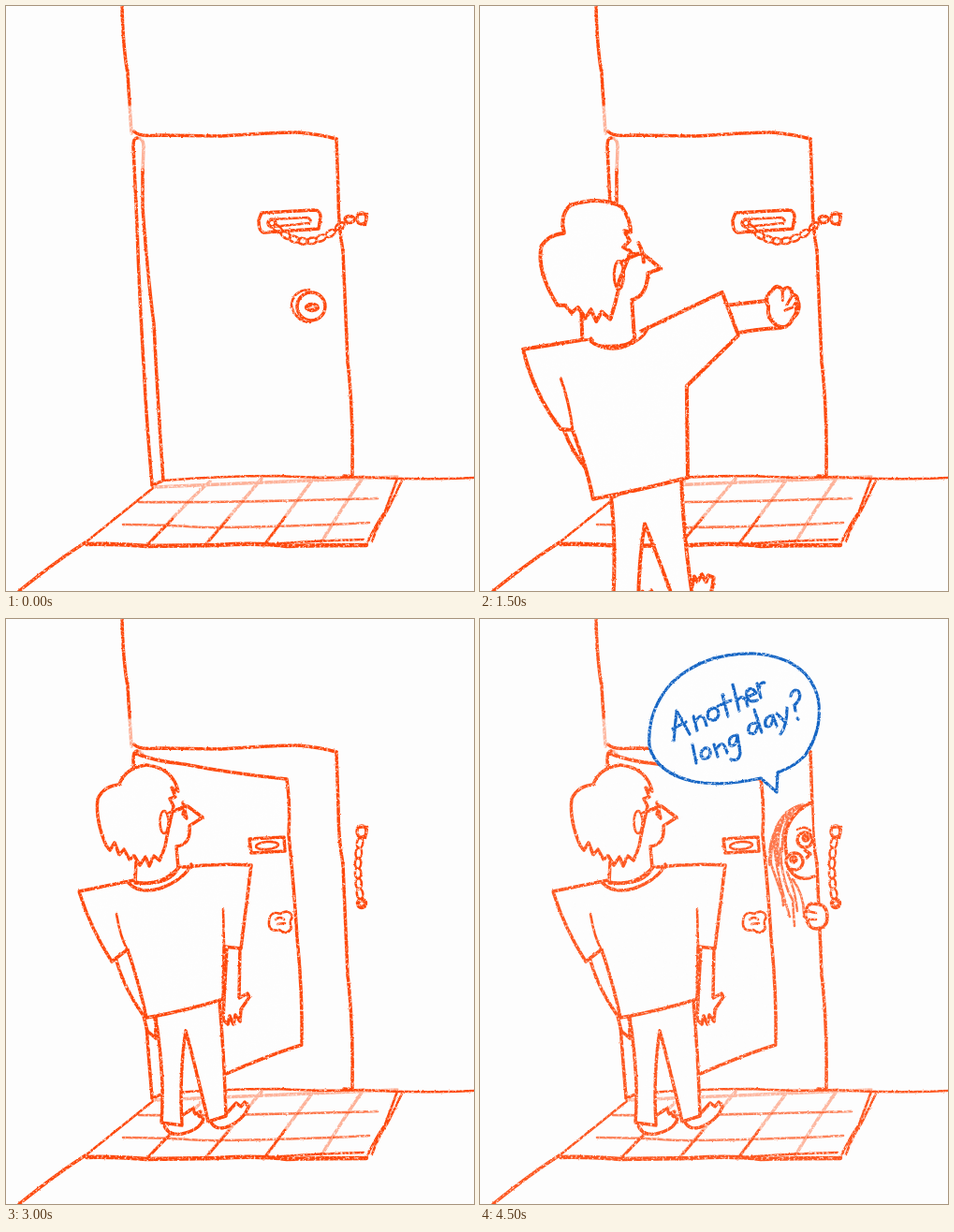
An HTML page that plays this animation: 500 by 625 pixels, repeating every 5000 ms.

```html
<!DOCTYPE html>
<html lang="en">
<head>
<meta charset="utf-8">
<title>Knock knock</title>
<style>
  html, body { margin: 0; width: 100%; height: 100%; overflow: hidden; background: #fdfdfd; }
  svg { display: block; width: 100vw; height: 100vh; }
  #scene { fill: none; stroke: #fd480c; stroke-width: 3.5; stroke-linecap: round; stroke-linejoin: round; }
  .solid { fill: #fdfdfd; }
  .mask { fill: #fdfdfd; stroke: none; }
  .pale { opacity: .42; }
  .thin { stroke-width: 2.6; }
  .bold { stroke-width: 4.4; }
  .blue { stroke: #1565c4; stroke-width: 3.2; }
</style>
</head>
<body>
<svg viewBox="0 0 500 625">
  <filter id="crayon" filterUnits="userSpaceOnUse" x="0" y="0" width="500" height="625" color-interpolation-filters="sRGB">
    <feTurbulence type="fractalNoise" baseFrequency=".4" numOctaves="2" seed="4" result="noise"/>
    <feDisplacementMap in="SourceGraphic" in2="noise" scale="2" xChannelSelector="R" yChannelSelector="G" result="rough"/>
    <feColorMatrix in="noise" values="0 0 0 0 0  0 0 0 0 0  0 0 0 0 0  0 0 0 3 -.45" result="grain"/>
    <feComposite in="rough" in2="grain" operator="in"/>
  </filter>
  <g filter="url(#crayon)"><g id="scene"></g></g>
</svg>
<script>
const line = (d, cls = '') => `<path class="${cls}" d="${d}"/>`;
const solid = d => line(d, 'solid');
const oval = (x, y, rx, ry, cls = '', turn = 0) =>
  `<ellipse class="${cls}" cx="${x}" cy="${y}" rx="${rx}" ry="${ry}" transform="rotate(${turn} ${x} ${y})"/>`;
const group = (content, transform = '', opacity = 1) =>
  `<g transform="${transform}" opacity="${opacity}">${content}</g>`;

// Links laid along a quadratic curve.
function chain(x0, y0, cx, cy, x1, y1, count) {
  let links = '';
  for (let i = 0; i < count; i++) {
    const t = (i + .5) / count, u = 1 - t;
    const x = u * u * x0 + 2 * u * t * cx + t * t * x1;
    const y = u * u * y0 + 2 * u * t * cy + t * t * y1;
    const dx = u * (cx - x0) + t * (x1 - cx), dy = u * (cy - y0) + t * (y1 - cy);
    links += oval(x, y, 5.5, 3.2, 'thin', Math.atan2(dy, dx) * 180 / Math.PI);
  }
  return links;
}

const room =
  line('M124 0Q125 45 130 72L132 105') + line('M132 105L134 136', 'pale') +
  line('M137 134Q141 140 165 138L230 139Q290 135 312 135Q335 137 353 142') +
  line('M353 142L355 200Q355 235 360 262L365 380Q371 430 370 503L361 502') +
  line('M156 511Q150 440 148 400Q142 300 140 235L136 150Q136 141 140 141') +
  line('M140 141Q147 141 147 150L146 180', 'pale') +
  line('M146 175L146 215Q151 285 158 340Q162 420 168 507L156 512') +
  line('M168 507Q230 502 290 502Q340 505 380 503Q440 507 500 504', 'thin') +
  line('M14 625Q55 592 85 573') + line('M85 573L157 515', 'thin') +
  line('M86 575Q110 574 150 577L225 576Q270 573 300 577Q345 576 385 576', 'bold') +
  line('M280 575Q335 571 382 570M385 576Q393 557 405 540L418 505M391 572Q398 552 408 538L423 507', 'thin') +
  line('M158 514L418 503M218 508Q195 528 150 577M273 505L212 577M330 503L275 577M382 503Q360 534 337 573', 'pale') +
  line('M178 548L150 577M238 547L212 577M298 546L275 577', 'thin') +
  group(line('M142 530Q230 531 397 526M125 554Q170 554 210 557Q290 557 388 552', 'thin'), '', .75);

const plate =
  line('M273 221L329 218Q336 218 336 225L334 238L275 242Q270 241 270 229Z') +
  line('M283 228L322 226Q328 229 324 232L284 236Q278 232 283 228', 'thin');
const knob = oval(326, 321, 15, 15) + oval(327, 322, 6, 3, 'bold') +
  line('M324 303Q306 304 305 320Q309 337 325 338', 'thin');
const anchor = oval(380, 227, 5, 6) + line('M375 223L386 222L384 234L376 232', 'thin');
const latched = chain(286, 234, 320, 270, 362, 231, 8) + oval(284, 232, 4, 4) +
  oval(367, 228, 5, 3.5) + anchor;
const hanging = anchor + chain(379, 234, 373, 266, 379, 299, 6) + oval(380, 304, 4, 4, 'bold');

const openDoor =
  solid('M139 144Q160 152 190 155Q240 165 300 171Q304 200 302 230Q308 290 311 340Q317 400 316 455Q280 466 233 487') +
  line('M260 235L297 233L298 248L262 250Z') + oval(279, 242, 12, 4, 'thin', -5) +
  line('M293 315Q282 311 281 323Q280 335 292 332Q300 339 305 330Q302 325 306 318Q302 309 293 315M288 321Q293 317 297 321M290 326L298 325', 'thin');

const word =
  line('M69 165L84 160L93 195L107 151L126 149L104 199Q130 208 144 205L153 214L148 229Q125 222 102 215L120 262L104 267Z') +
  line('M148 158L162 155L205 192L178 132L193 126L223 214L213 221L168 179L180 227L168 231Z') +
  oval(254, 153, 32, 36) + oval(254, 153, 16, 20) +
  line('M328 87Q295 93 296 125Q300 163 328 164Q358 160 354 128L338 132Q340 147 326 147Q309 143 311 120Q315 104 332 99Z') +
  line('M347 63L357 58L373 80L379 44L394 46L387 92L428 102L424 121L386 106L402 133L390 140Q373 108 363 84L353 66Z');
const knocks = word + group(word, 'translate(0 265.5)');

const closeMan =
  solid('M-4 500L45 493L71 488L114 478L255 476Q263 479 262 490Q250 538 235 582L222 584L216 630L-4 630Z') +
  solid('M73 489L71 478L67 476L62 468L56 465L52 458L45 456L38 450L36 457L30 444L28 451L22 438Q6 395 7 376Q9 364 20 362L11 358Q24 352 38 357Q50 331 78 330Q108 333 119 358L113 356L117 366L112 371L117 374L112 380L113 400L130 392L154 404L134 417L135 438Q132 452 113 452L115 479') +
  line('M71 478L76 468L80 472L86 462L90 466L94 454L99 456L105 414') +
  line('M107 402Q97 396 97 406Q99 417 104 418M107 402L128 394M113 400L107 416M127 376Q131 388 127 408M130 393L130 407L134 417', 'thin') +
  line('M48 493Q54 510 88 508Q123 506 132 484M51 492Q62 503 96 500Q124 496 130 481') +
  line('M188 582L234 583') + line('M190 550Q183 590 181 625M190 585L191 625M34 553Q40 575 51 594L58 625', 'thin') +
  line('M0 603Q10 617 17 618L47 608M24 616L30 625');

const arm = solid('M262 275L279 262L327 240L343 262Q315 272 288 290L268 300') +
  solid('M326 246Q319 240 325 231Q327 223 334 228Q339 220 344 229Q352 228 349 238Q355 241 351 250Q350 262 340 261Q328 258 326 246') +
  line('M334 228L337 237M344 230L342 240M349 239L342 245', 'thin');

function reachingMan(sleeve, armTransform) {
  return solid('M125 378Q133 400 149 418L147 390') +
    solid('M193 547Q185 554 190 557Q208 554 213 537L206 527L203 533L198 528') +
    solid('M233 541Q234 553 246 552Q262 542 264 515L259 513L257 519L253 512L249 519L246 514L243 527') +
    solid('M169 442Q174 490 170 546L194 547Q194 500 200 465Q213 497 230 545L246 542Q237 490 234 425') +
    group(arm, armTransform) +
    solid(`M150 293L87 303Q97 345 122 377L133 378Q147 415 152 442Q195 434 240 422L239 337L${sleeve}L197 286`) +
    line('M122 330Q130 352 133 378', 'thin') +
    solid('M142 293L141 266L175 215L198 214L215 228L203 232Q202 254 188 257L190 287Q194 299 172 300Q152 302 150 293') +
    solid('M125 194Q121 178 131 169Q160 160 179 171Q187 183 187 194L181 193L186 202L180 208L187 212L176 240L175 250L172 262L168 275L160 268L155 277L150 266L145 274L138 264L132 269L126 262L119 262Q99 230 104 207Q111 196 125 195') +
    oval(176, 234, 4.5, 13, 'thin') +
    line('M177 222L196 214', 'thin') + line('M194 204Q199 213 199 222') +
    line('M150 296Q170 309 191 296Q202 289 203 282', 'thin');
}
const raisedSleeve = '287 290L272 250';
const unlatchingMan = reachingMan(raisedSleeve, '');
const approachingMan = group(reachingMan(raisedSleeve, 'translate(-18 2) rotate(18 283 275)'),
  'translate(-54 18.4) scale(1.15)');
const openingMan = group(reachingMan('278 315L294 286L262 268', 'translate(5 25) rotate(55 283 275)'),
  'translate(-10 -9)');

const standingMan =
  solid('M117 362Q126 395 147 424L151 440L160 448L160 430L130 354') +
  solid('M168 538Q172 553 188 550Q207 546 211 534L206 531L208 526L202 529L200 523L187 531') +
  solid('M218 535Q222 547 235 543Q254 536 259 521L255 516L251 521L246 517L234 530') +
  solid('M160 426Q170 490 166 538L188 541Q185 485 192 440Q203 480 216 537L235 531Q233 465 228 408') +
  solid('M236 350L233 407L232 428L237 433L239 424L243 433L245 423L250 430L251 417L260 404L258 400L249 405L250 350') +
  solid('M137 279L78 291Q90 330 113 366L130 353Q144 396 150 426Q195 418 232 406L233 350L251 352Q257 303 262 263Q225 261 189 265') +
  line('M118 315Q122 340 130 354M232 310L233 350', 'thin') +
  solid('M138 282L139 260L172 208L194 200L210 212L196 221Q198 241 182 243L184 266Q175 285 138 282') +
  solid('M184 184L177 180L181 190L175 192L179 200L172 232L170 243L164 258L158 253L153 264L149 254L143 263L137 253L132 257L126 246L121 252L116 239L111 247L107 242Q95 214 98 192Q105 178 121 177Q127 159 150 156Q178 159 184 184') +
  oval(169, 217, 4.5, 12, 'thin') +
  line('M174 207L190 200', 'thin') + line('M189 196L193 213L189 209L191 199') +
  line('M131 282Q142 294 164 288Q190 279 198 262M138 281Q166 287 186 264');

const girl =
  line('M354 198Q316 195 312 228L310 262L325 310L337 326L340 278L357 276Z', 'mask') +
  line('M352 197Q327 211 326 236Q327 258 331 268Q340 282 357 275M347 247L353 251L349 255') +
  group(line('M345 199Q318 206 313 240M338 202Q308 222 310 262M328 207Q313 228 319 262', 'bold') +
    line('M314 240Q317 275 331 318M321 245Q322 280 334 300L336 328M328 270Q337 290 339 312M334 278Q347 296 346 318M311 262L323 296L324 306M334 207Q322 220 323 248', 'thin'), '', .8) +
  oval(347, 236, 8, 8, 'solid') + oval(336, 259, 9, 9, 'solid') +
  oval(348, 234, 2.5, 2.5, 'bold') + oval(335, 257, 2.5, 2.5, 'bold') +
  line('M339 225Q347 220 353 226', 'thin') +
  solid('M362 305Q349 302 349 311Q345 317 350 321Q350 330 359 331Q371 330 371 319Q371 306 362 305') +
  line('M349 312L359 314M350 321L359 321', 'thin');

const bubble = (label, outline, letters) => `<g class="blue" role="img" aria-label="${label}">` +
  line(outline, 'solid') + letters.map(d => line(d)).join('') + '</g>';

const weekBubble = bubble("How's this week going?",
  'M308 174Q272 187 236 185Q190 180 175 147Q160 108 178 67Q205 16 285 12Q372 10 392 53Q404 95 382 132Q362 158 329 168L326 193Z', [
  'M184 81L190 114M203 75L209 107M187 99L206 92',
  'M218 87Q210 92 213 99Q220 107 225 97Q225 87 218 87',
  'M228 86L234 101L239 88L245 98L247 80M250 69Q258 70 251 81',
  'M273 67Q262 69 265 77Q277 77 275 85Q271 91 264 88',
  'M196 131L199 153M190 143L205 138M207 121L212 149M210 139Q220 129 222 146',
  'M226 131L229 144M232 126L246 122L238 131Q251 130 248 138Q243 144 236 140',
  'M267 107L273 126L279 113L286 122L288 104',
  'M293 112L305 107Q300 98 294 105Q291 120 306 116M312 105L323 100Q318 92 313 98Q310 112 324 109',
  'M328 79L334 105M345 86L333 95L348 99',
  'M281 144Q268 143 268 153Q275 161 281 146L283 160Q281 171 270 167',
  'M293 141Q284 146 289 153Q298 157 299 147Q298 141 293 141M304 140L306 153M301 141L312 137L314 152M313 145Q321 131 324 148',
  'M337 131Q326 131 328 141Q336 146 337 131L339 151Q336 161 326 156',
  'M345 109Q349 100 357 103Q365 111 353 119L353 126M354 133L355 134'
]);

const dayBubble = bubble('Another long day?',
  'M300 170Q260 179 230 174Q188 165 181 136Q178 98 205 68Q240 35 295 37Q350 42 361 84Q367 118 347 146Q337 157 318 164L317 185Z', [
  'M207 130L210 98L224 123M206 117L220 110',
  'M228 104L232 119M230 110Q238 96 242 114',
  'M249 95Q241 98 244 106Q252 112 255 102Q255 95 249 95',
  'M259 81L265 104M254 93L268 87M270 70L277 98M274 88Q282 77 286 93',
  'M285 84L295 79Q290 71 285 77Q283 91 296 87M296 69L300 84M298 75Q299 67 304 68',
  'M227 134L231 154M240 138Q233 143 238 149Q247 150 246 141Q244 137 240 138',
  'M250 134L254 147M252 140Q260 126 264 143',
  'M275 124Q264 125 267 135Q274 138 275 124L278 143Q277 153 268 150',
  'M296 111Q285 111 287 121Q295 127 297 112M293 97L301 121',
  'M313 103Q303 104 305 114Q312 118 313 104L317 114M317 101L325 109M328 95Q328 114 321 123',
  'M332 82Q334 74 340 77Q345 84 336 92L337 98M339 106L340 107'
]);

const closedDoor = plate + knob;
const start = room + closedDoor + latched;
const ajar = room + openDoor + hanging + standingMan;
const peeking = room + openDoor + girl + hanging + standingMan;

const scenes = [
  start,
  group(start, '', .8) + knocks,
  start + closeMan,
  start + approachingMan,
  room + closedDoor + anchor + chain(347, 268, 368, 268, 380, 232, 5) + unlatchingMan,
  room + closedDoor + hanging + openingMan,
  ajar,
  peeking,
  group(peeking, '', .92) + weekBubble,
  group(peeking, '', .92) + dayBubble
];

const stage = document.getElementById('scene');
let shown = -1;
function play() {
  const index = Math.floor(performance.now() / 500) % scenes.length;
  if (index !== shown) stage.innerHTML = scenes[shown = index];
  requestAnimationFrame(play);
}
play();
</script>
</body>
</html>
```
